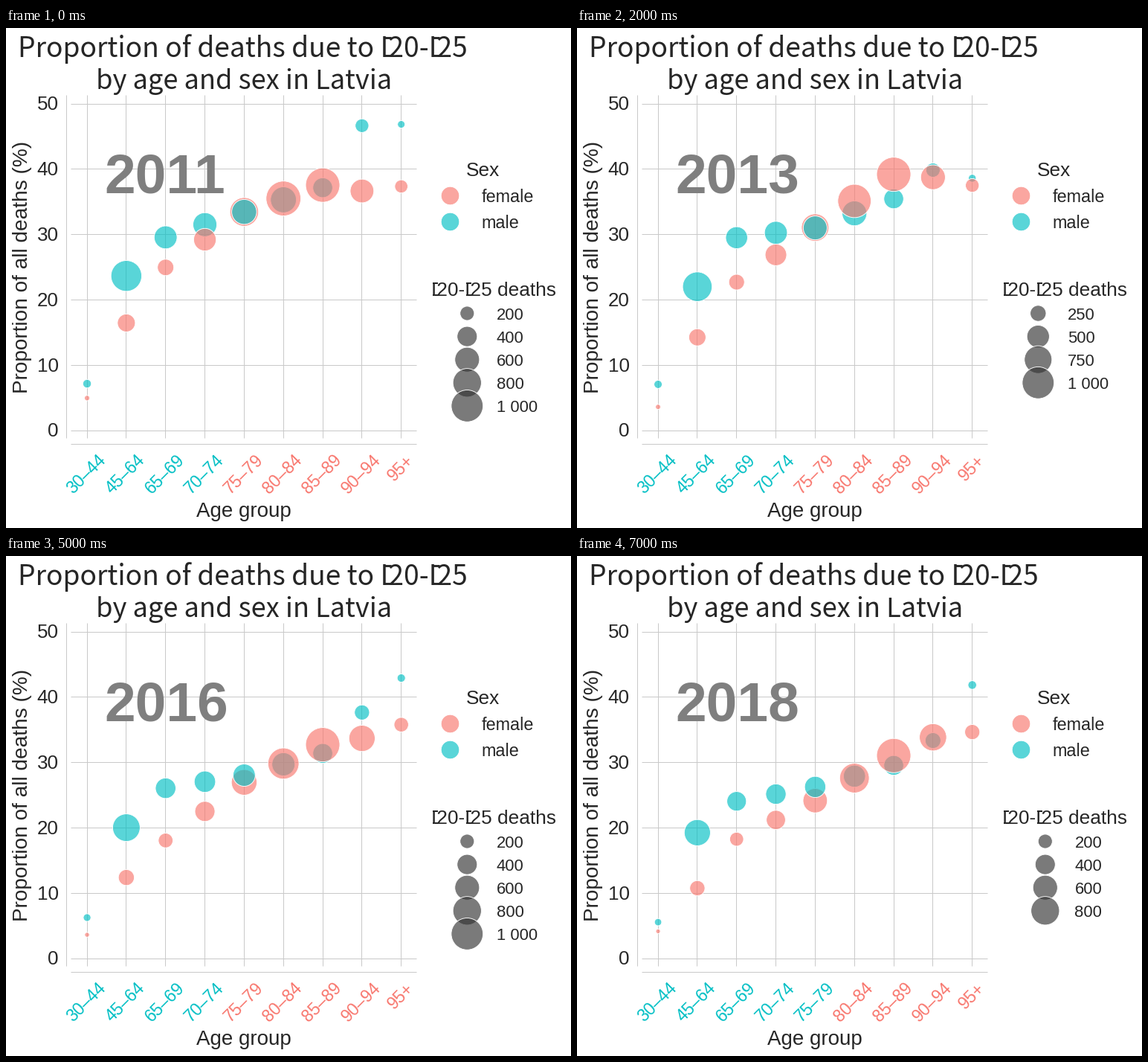
These frames come from a looping animation (760 by 672 pixels, 8 s). A matplotlib script:

```python
import matplotlib.pyplot as plt
import numpy as np
from matplotlib.animation import FuncAnimation
from matplotlib.colors import to_rgba
from matplotlib.patches import Circle

W, H, DPI = 760, 672, 100
PT = 72 / DPI  # points per pixel
INK, GRID = "#262626", "#c9c9c9"
MALE, FEMALE = "#00BFC4", "#F8766D"
ALPHA = 0.65
FIRST_YEAR, N_YEARS = 2011, 8
AGES = ["30–44", "45–64", "65–69", "70–74", "75–79",
        "80–84", "85–89", "90–94", "95+"]
AGE_IDS = np.arange(len(AGES))

# Share of all deaths (%) at a few ages and years; the rest is interpolated.
KEY_AGES = [0, 1, 2, 4, 6, 7, 8]
MALE_SHARE = {
    2011: [7.1, 23.6, 29.5, 33.4, 37.1, 46.6, 46.8],
    2012: [8.0, 22.4, 31.1, 30.9, 35.2, 39.8, 33.7],
    2014: [6.0, 21.5, 27.8, 31.0, 35.6, 39.8, 43.4],
    2017: [6.3, 19.2, 25.1, 26.5, 29.2, 36.5, 42.6],
    2018: [5.5, 19.2, 24.0, 26.2, 29.5, 33.3, 41.8],
}
FEMALE_SHARE = {
    2011: [4.9, 16.4, 24.9, 33.4, 37.5, 36.6, 37.3],
    2012: [3.4, 14.2, 24.1, 32.3, 39.5, 37.9, 36.9],
    2014: [3.7, 14.2, 21.2, 29.7, 38.8, 39.5, 38.0],
    2017: [3.5, 11.4, 16.4, 25.5, 29.6, 30.7, 34.6],
    2018: [4.1, 10.7, 18.2, 24.1, 31.0, 33.8, 34.6],
}


def share(table, year):
    rows = [np.interp(AGE_IDS, KEY_AGES, row) for row in table.values()]
    return [np.interp(year, list(table), col) for col in zip(*rows)]


def radius(sex, year):
    """Bubbles peak in late age; the young shrink and the oldest grow."""
    if sex == MALE:
        start = np.interp(AGE_IDS, [0, 1, 2, 5, 8], [5.7, 20.7, 15.4, 17.4, 5])
    else:
        start = np.interp(AGE_IDS, [0, 1, 2, 5, 6, 8], [3.6, 12, 11, 23.4, 23, 8.8])
    growth = np.interp(AGE_IDS, [5, 7], [0.85, 1.15])
    return start * (1 + (growth - 1) * (year - FIRST_YEAR) / (N_YEARS - 1))


def size_keys(year):
    step = 250 if 2012 <= year <= 2014 else 200
    top = 1250 if year == 2012 else 1000 if year < 2017 else 800
    return range(step, top + 1, step)


def x_of(i):
    return 109.05 + 52.83 * i


def y_of(pct):
    return 540.4 - 8.78 * pct


fig = plt.figure(figsize=(W / DPI, H / DPI), dpi=DPI, facecolor="white")
ax = fig.add_axes([0, 0, 1, 1])
ax.set_xlim(0, W)
ax.set_ylim(H, 0)
ax.axis("off")


def line(x, y, color=GRID, width=1, z=1):
    ax.plot(x, y, color=color, lw=width * PT, zorder=z, solid_capstyle="butt")


def label(x, y, s, size, color=INK, font="Liberation Sans", ha="left", **kw):
    return ax.text(x, y, s, fontsize=size * PT, color=color, family=font,
                   ha=ha, va="baseline", zorder=3, **kw)


def bubble(x, y, r, color):
    return ax.add_patch(Circle((x, y), r, fc=to_rgba(color, ALPHA),
                               ec="white", lw=0.9 * PT, zorder=4))


def serif_label(x, y, s, size, font, cap, bar):
    """Text whose capital I carries short bars at top and foot."""
    label(x, y, s, size, font=font)
    stem = 0.092 * size
    for k, ch in enumerate(s):
        if ch != "I":
            continue
        probe = label(x, y, s[:k + 1], size, font=font)
        mid = x + probe.get_window_extent().width - stem / 2
        probe.remove()
        for edge in (y - stem / 2, y - cap * size + stem / 2):
            line([mid - bar / 2, mid + bar / 2], [edge, edge], INK, 0.85 * stem, 3)


# Grid (nudged to whole pixels) and detached axis lines
for pct in range(0, 51, 10):
    line([87, 552], [y_of(pct) + 0.2] * 2)
    label(70.5, y_of(pct) + 9, str(pct), 26, ha="right")
for i in AGE_IDS:
    line([x_of(i) - 0.5] * 2, [89.5, 551])
line([81, 81], [89.5, 551])
line([87, 552], [558.5, 558.5])

# Titles
serif_label(16.5, 39, "Proportion of deaths due to I20-I25", 37.2,
            "Noto Sans CJK JP", 0.733, 10)
label(320, 82, "by age and sex in Latvia", 36.3, font="Noto Sans CJK JP",
      ha="center")
label(320, 657, "Age group", 27.8, ha="center")
label(29, 321, "Proportion of all deaths (%)", 28, ha="center", rotation=90,
      rotation_mode="anchor")

# Slanted age labels share one top edge
ticks = []
for i, age in enumerate(AGES):
    mid_y = 578.5 + 4 * len(age)
    ticks.append(label(x_of(i) + 3.7, mid_y + 5.7, age, 23, ha="center",
                       rotation=45, rotation_mode="anchor"))

# Colour and size keys
label(619, 199, "Sex", 26.3)
for y, name, color in ((225.5, "female", FEMALE), (260.5, "male", MALE)):
    bubble(597.5, y, 12.3, color)
    label(639.5, y + 8.5, name, 23.4)
serif_label(571.5, 360, "I20-I25 deaths", 26.3, "Liberation Sans", 0.688, 7)
key_dots = [bubble(620, 383.5 + 31.1 * k, 1, "#333333") for k in range(5)]
key_texts = [label(660, 391.5 + 31.1 * k, "", 22) for k in range(5)]

year_text = label(132, 222, "", 74.9, color="#7f7f7f", weight="bold")

# Men lie underneath, except in the 75–79 group.
men, women = [], []
for i, age in enumerate(AGES):
    pair = [(men, MALE), (women, FEMALE)]
    for group, color in (pair[::-1] if age == "75–79" else pair):
        group.append(bubble(x_of(i), 0, 1, color))


def place(dots, pcts, radii):
    for i, (dot, pct, r) in enumerate(zip(dots, pcts, radii)):
        dot.center = (x_of(i), y_of(pct))
        dot.set_radius(r)


def update(frame):
    year = FIRST_YEAR + frame
    year_text.set_text(str(year))
    place(men, share(MALE_SHARE, year), radius(MALE, year))
    place(women, share(FEMALE_SHARE, year), radius(FEMALE, year))

    male_groups = 5 if year == 2018 else 4
    for i, tick in enumerate(ticks):
        tick.set_color(MALE if i < male_groups else FEMALE)

    keys = size_keys(year)
    shift = 9.5 if max(keys) < 1000 else 0
    for k, (dot, text) in enumerate(zip(key_dots, key_texts)):
        shown = k < len(keys)
        dot.set_visible(shown)
        text.set_visible(shown)
        if shown:
            dot.center = (620.3 + shift, dot.center[1])
            dot.set_radius(21.4 * np.sqrt(keys[k] / 1000))
            text.set_x(660 + shift)
            text.set_text(f"{keys[k]:,}".replace(",", " "))
    return men + women + key_dots + key_texts + ticks + [year_text]


anim = FuncAnimation(fig, update, frames=N_YEARS, interval=1000, repeat=True,
                     repeat_delay=0, blit=False)
plt.show()
```
